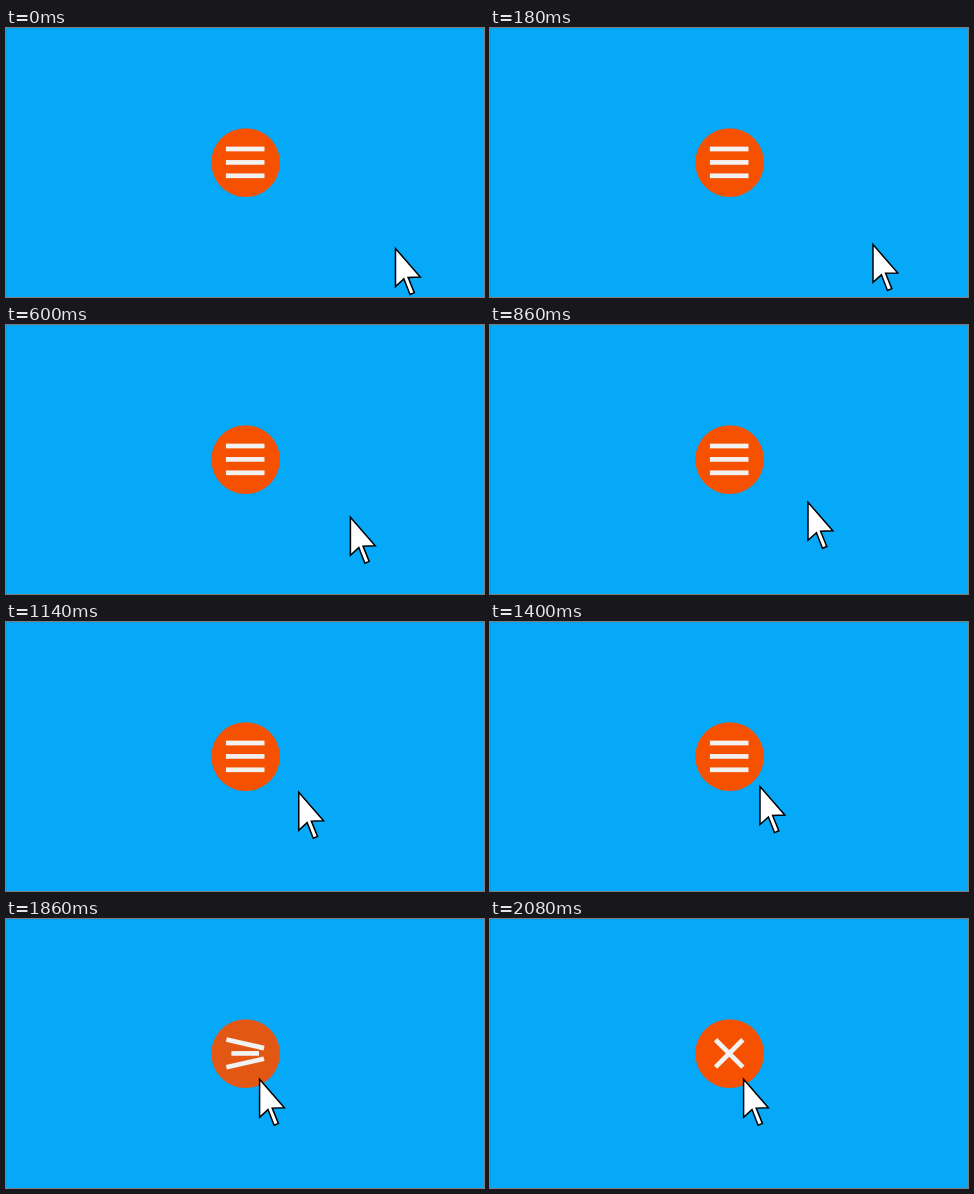
Write an HTML page that moves like this. It is 478x269 px and loops after 3.56 s.

```html
<!DOCTYPE html>
<html lang="en">
<head>
<meta charset="utf-8">
<title>Menu button</title>
<style>
  html, body { margin: 0; width: 100%; height: 100%; overflow: hidden; background: #05a9f8; }
  svg { display: block; width: 100%; height: 100%; }
</style>
</head>
<body>
<svg viewBox="0 0 478 269">
  <rect width="478" height="269" fill="#05a9f8"/>
  <path d="M.5 269V.5H478" fill="none" stroke="#099fe8"/>
  <circle id="button" cx="239.6" cy="134.6" r="34.4"/>
  <g fill="#f2f2f2">
    <rect id="top" x="-19.3" y="-2.35" width="38.6" height="4.7"/>
    <rect id="middle" x="-19.3" y="-2.35" width="38.6" height="4.7"/>
    <rect id="bottom" x="-19.3" y="-2.35" width="38.6" height="4.7"/>
  </g>
  <path id="cursor" d="M0 0V38L8.4 30.4L14.5 46L18.8 44.2L12.6 28.9L24.8 28.5Z"
        fill="#fff" stroke="#000" stroke-width="1.5"/>
</svg>
<script>
const LOOP = 3560, STEP = 20, CLICK = 1740, OPEN = 2080;
const REST = [246, 81, 0], PRESSED = [216, 90, 32];
// Cursor path: time, x, y, easing power towards the next point
const PATH = [
  [0, 389.5, 220.5, 1.7],
  [340, 370.3, 208.5, 1],
  [540, 350.5, 195.7, 1],
  [860, 318, 177.3, 1],
  [1080, 298, 171.5, 1],
  [1400, 270, 164.6, 1],
  [1560, 253.6, 160.2, 1]
];
const el = id => document.getElementById(id);
const mix = (a, b, p) => a + (b - a) * p;
const clamp = p => Math.min(1, Math.max(0, p));
const smooth = p => p * p * (3 - 2 * p);

function cursorAt(t) {
  const next = PATH.findIndex(point => point[0] > t);
  if (next < 0) return PATH[PATH.length - 1].slice(1, 3);
  const a = PATH[next - 1], b = PATH[next];
  const p = ((t - a[0]) / (b[0] - a[0])) ** a[3];
  return [mix(a[1], b[1], p), mix(a[2], b[2], p)];
}

function placeBar(id, offset, angle, width = 1) {
  el(id).setAttribute('transform',
    `translate(239.2 ${134.4 + offset}) rotate(${angle}) scale(${width} 1)`);
}

function draw(t) {
  const p = clamp((t - CLICK) / (OPEN - CLICK));
  const open = smooth(p);
  const color = t < CLICK ? REST : PRESSED.map((c, i) => mix(c, REST[i], p));
  el('button').setAttribute('fill', `rgb(${color.map(Math.round)})`);
  placeBar('top', mix(-13.4, 0, open), 45 * open);
  placeBar('middle', 0, 0, 1 - open);
  placeBar('bottom', mix(13.4, 0, open), -45 * open);
  el('cursor').setAttribute('transform', `translate(${cursorAt(t)})`);
}

function frame() {
  const t = performance.now() % LOOP;
  draw(Math.floor(t / STEP) * STEP);
  requestAnimationFrame(frame);
}
frame();
</script>
</body>
</html>
```
